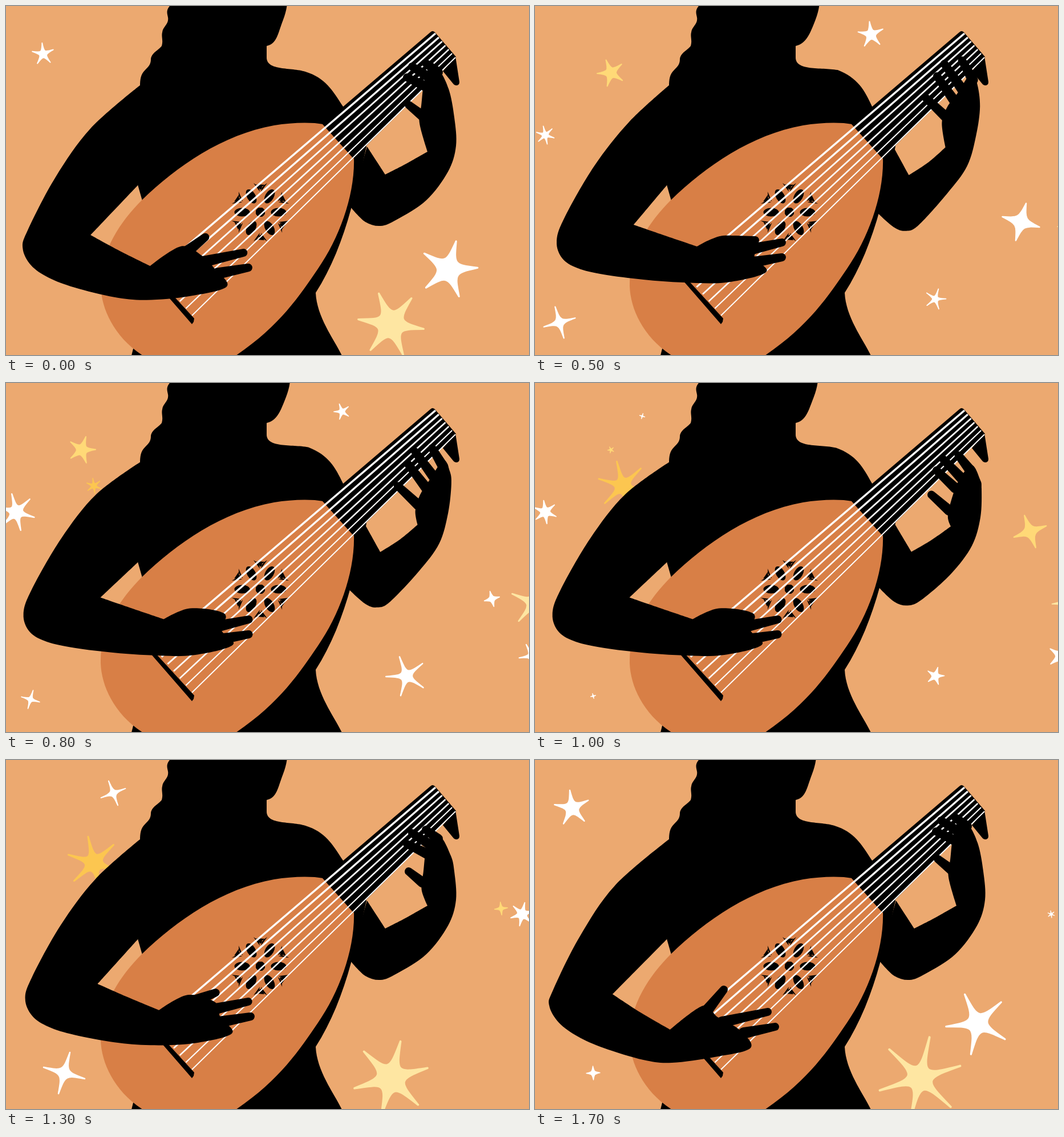
These frames come from a looping animation (917x611 px, 1.8 s). An HTML page with a canvas:

```html
<!DOCTYPE html>
<html lang="en">
<head>
<meta charset="utf-8">
<title>Lute player</title>
<style>
html, body { margin: 0; width: 100%; height: 100%; overflow: hidden; background: #eca970; }
canvas { display: block; }
</style>
</head>
<body>
<canvas id="stage" width="917" height="611"></canvas>
<script>
const ctx = document.getElementById('stage').getContext('2d');
const STEPS = 18, STEP_MS = 100, TAU = Math.PI * 2;
const WHITE = '#fff', PALE = '#fee6a2', YELLOW = '#ffd977', GOLD = '#fcc650', WOOD = '#d87f46';

const mix = (a, b, k) => a + (b - a) * k;
const blend = (from, to, k) => from.map((v, i) => mix(v, to[i], k));
const shift = (points, dx, dy) => points.map((v, i) => v + (i % 2 ? dy : dx));
// Rises and falls once between two moments, otherwise 0.
const swell = (step, start, end) =>
  step > start && step < end ? Math.sin((step - start) / (end - start) * Math.PI) : 0;

// Strumming arm from upper arm around the elbow and hand to the inner elbow.
const strumLevel = {
  arm: [165,203, 104,280, 52,370, 38,412, 48,442, 75,459, 120,470, 190,479, 260,484, 335,484,
    405,466, 385,440, 390,411, 330,402, 284,421, 228,402, 173,383],
  fingers: [350,412,386,410, 378,426,433,414, 380,449,433,440]
};
const strumDipped = {
  arm: [140,220, 78,310, 32,402, 25,430, 42,460, 75,484, 120,504, 190,525, 240,530, 315,520,
    378,504, 358,472, 320,450, 295,430, 237,472, 185,442, 136,410],
  fingers: [302,438,331,402, 328,459,408,441, 366,478,421,467]
};
// Fretting arm: elbow and outer forearm, the hand, and the inner forearm.
const fretFolded = {
  outer: [605,353, 630,378, 657,385, 685,374, 737,340, 775,290, 789,245, 786,195],
  hand: [776,145, 757,112, 735,130, 728,175, 725,205],
  inner: [739,255, 700,277, 665,295, 633,246],
  fingers: [757,116,736,100, 745,127,712,106, 738,142,703,125, 730,192,706,173]
};
const fretOpen = {
  outer: [602,364, 630,388, 650,394, 672,384, 722,328, 757,280, 773,225, 780,175],
  hand: [775,135, 765,118, 742,152, 722,178, 713,205],
  inner: [719,247, 690,273, 655,296, 630,250],
  fingers: [768,130,749,95, 750,148,718,101, 736,168,705,123, 722,196,684,160]
};

// x, y, size, spikes, first and last step of life, color
const stars = [
  [65, 84, 33, 5, 14, 19, WHITE], [776, 461, 56, 5, 14.5, 20, WHITE],
  [675, 557, 85, 6, 10, 20.5, PALE], [589, 50, 23, 5, .5, 10, WHITE],
  [852, 378, 34, 4, 1.5, 9, WHITE], [133, 117, 29, 5, 2.5, 10.5, YELLOW],
  [18, 226, 33, 6, 3.7, 11.7, WHITE], [702, 513, 37, 5, 3.8, 11, WHITE],
  [43, 554, 31, 4, 2.5, 9.2, WHITE], [154, 180, 53, 6, 7.3, 16, GOLD],
  [188, 58, 23, 4, 9.5, 17, WHITE], [102, 548, 39, 4, 9.7, 17.8, WHITE],
  [868, 260, 37, 4, 8.5, 13.5, YELLOW], [922, 478, 26, 5, 6, 12, WHITE],
  [905, 270, 29, 6, 11.5, 17.4, WHITE], [926, 385, 42, 5, 4.5, 11, PALE]
];

function fillPath(d, color = '#000') {
  ctx.fillStyle = color;
  ctx.fill(new Path2D(d));
}

// Smooth closed outline through the points, sharp at the given corners.
function blob(p, corners) {
  const n = p.length / 2;
  const at = (i, axis) => p[(i + n) % n * 2 + axis];
  const slope = (i, axis) => corners.includes(i % n) ? 0 : (at(i + 1, axis) - at(i - 1, axis)) / 6;
  ctx.beginPath();
  ctx.moveTo(p[0], p[1]);
  for (let i = 0; i < n; i++) {
    const [x1, y1] = [0, 1].map(axis => at(i, axis) + slope(i, axis));
    const [x2, y2] = [0, 1].map(axis => at(i + 1, axis) - slope(i + 1, axis));
    ctx.bezierCurveTo(x1, y1, x2, y2, at(i + 1, 0), at(i + 1, 1));
  }
  ctx.fillStyle = '#000';
  ctx.fill();
}

function drawFingers(p, baseRadius, tipRadius) {
  ctx.fillStyle = '#000';
  for (let i = 0; i < p.length; i += 4) {
    const [x1, y1, x2, y2] = p.slice(i, i + 4);
    const side = Math.atan2(y2 - y1, x2 - x1) + TAU / 4;
    ctx.beginPath();
    ctx.arc(x1, y1, baseRadius, side, side + TAU / 2);
    ctx.arc(x2, y2, tipRadius, side + TAU / 2, side + TAU);
    ctx.fill();
  }
}

function drawStar([x, y, size, spikes, born, dies, color], index, step) {
  const radius = size * Math.max(swell(step, born, dies), swell(step + STEPS, born, dies));
  if (radius < 2) return;
  const turn = (-95 + 22 * Math.sin(step * 1.3 + index * 2)) * TAU / 360;
  const fat = .17 + .08 * Math.sin(step * 2 + index);
  const spot = (i, r) => {
    const a = turn + i * TAU / spikes;
    return [x + r * Math.cos(a), y + r * Math.sin(a)];
  };
  ctx.beginPath();
  ctx.moveTo(...spot(0, radius));
  for (let i = 0; i < spikes; i++) {
    const valley = spot(i + .5, radius * fat);
    ctx.bezierCurveTo(...valley, ...valley, ...spot(i + 1, radius));
  }
  ctx.closePath();
  ctx.fillStyle = ctx.strokeStyle = color;
  ctx.lineWidth = 1 + radius * .04;
  ctx.lineJoin = 'round';
  ctx.fill();
  ctx.stroke();
}

function drawBody(lean) {
  fillPath(`M287 -5V0C280 8 283 14 284 20C286 32 275 36 274 46C272 54 276 60 273 70
    C268 77 255 82 254 93C254 102 250 106 244 112C236 120 235 128 235 142L231 313L239 341L300 500
    L223 600L220 612H589C575 583 545 545 543 502C570 460 590 410 605 355L620 300L632 246L600 200L591 176
    C${572 + lean} 147 ${560 + lean} 126 ${525 + lean} ${115 - lean / 2}C500 107 457 114 457 90V70
    C475 66 ${476 + lean} 50 ${486 + lean} 24Q${492 + lean} 8 ${493 + lean} -5Z`);
}

function drawRose() {
  for (let i = 0; i < 6; i++) {
    ctx.save();
    ctx.translate(446, 361);
    ctx.rotate(i * TAU / 6);
    ctx.beginPath();
    ctx.ellipse(32, 0, 13.5, 7.5, 0, 0, TAU);
    ctx.arc(0, 0, 8, 0, TAU);
    ctx.fillStyle = '#000';
    ctx.fill();
    ctx.rotate(TAU / 12);
    fillPath('M36 1L51 12L45 3ZM36 -1L51 -12L45 -3ZM39 0L49 -7L48 7Z');
    ctx.restore();
  }
}

function drawLute() {
  fillPath(`M556 207C535 203 500 204 470 209C380 225 300 280 238 340C200 378 165 430 166 490
    C167 530 190 580 240 612H403C480 560 515 507 547 460C585 405 612 330 610 266Z`, WOOD);
  fillPath('M555 207L744 46Q748 42 752 46L789 89L609 267Z');
  fillPath('M766 114L788 88L795 133Q795 139 789 139Q786 139 784 136Z');
  drawRose();
  ctx.strokeStyle = WHITE;
  for (let i = 0; i < 7; i++) {
    const k = i / 6;
    ctx.beginPath();
    ctx.moveTo(mix(262, 326, k), mix(467, 542, k));
    ctx.lineTo(mix(753, 788, k), mix(48, 90, k));
    ctx.lineWidth = mix(3.6, 1.8, k);
    ctx.stroke();
  }
  fillPath('M252 472L261 472L330 547L329 553L326 557Z');
}

function drawStrumArm(step) {
  const dip = Math.max(0, Math.min((step - 11) / 6, (20 - step) / 3), (2 - step) / 3);
  const lift = 8 * swell(step, 5, 13);
  const arm = shift(blend(strumLevel.arm, strumDipped.arm, dip), -lift, -lift);
  blob([236,138, ...arm, 231,314, 250,240], [0, 15, 17, 18, 19]);
  drawFingers(shift(blend(strumLevel.fingers, strumDipped.fingers, dip), -lift, 0), 10, 7);
}

function drawFretArm(step, sway) {
  const drop = swell(step, 6, 15.5);
  const part = name => blend(fretFolded[name], fretOpen[name], sway);
  blob([...part('outer'), ...shift(part('hand'), 5 * drop, 30 * drop), ...part('inner'), 618,300],
    [0, 13, 15, 16, 17]);
  drawFingers(shift(part('fingers'), 0, 30 * drop), 9, 7);
}

function draw(step) {
  const sway = swell(step, 0, 12);
  ctx.fillStyle = '#eca970';
  ctx.fillRect(0, 0, 917, 611);
  stars.forEach((star, i) => drawStar(star, i, step));
  drawBody(6 * sway);
  drawLute();
  drawStrumArm(step);
  drawFretArm(step, sway);
}

function tick() {
  draw(Math.floor(performance.now() / STEP_MS) % STEPS);
  requestAnimationFrame(tick);
}
tick();
</script>
</body>
</html>
```
